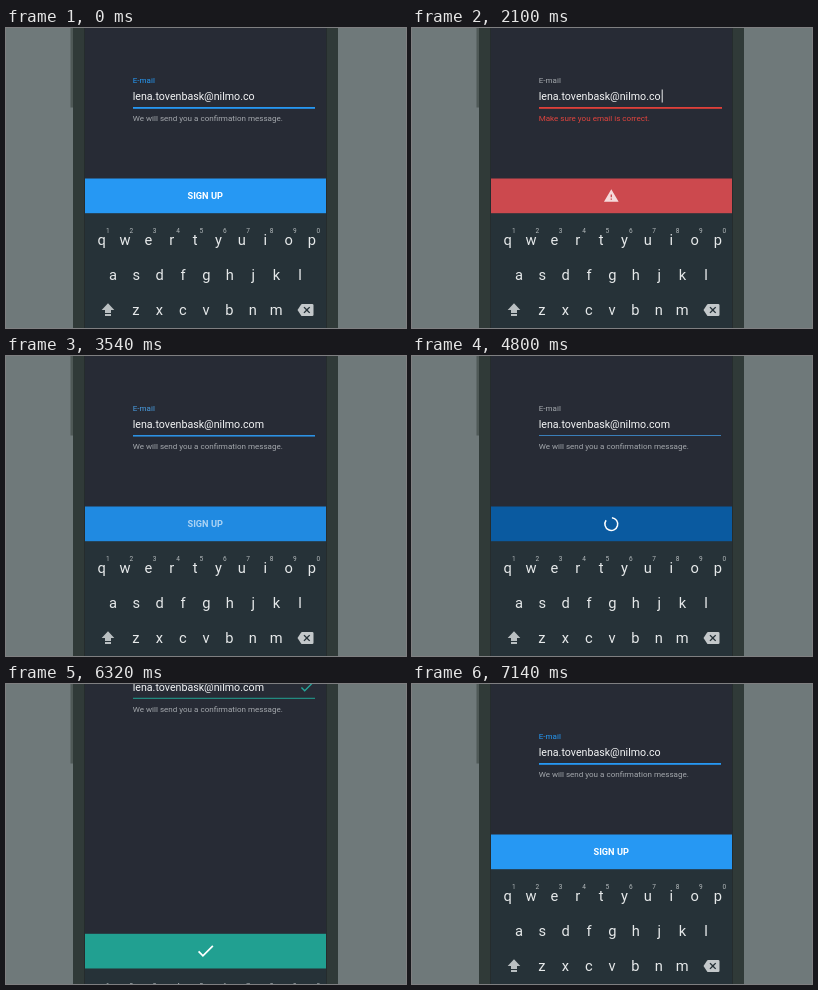
An HTML page that plays this animation: 400 by 300 pixels, repeating every 7160 ms.

```html
<!DOCTYPE html>
<html lang="en">
<head>
<meta charset="utf-8">
<title>E-mail sign up</title>
<style>
  html, body { margin: 0; width: 100%; height: 100%; overflow: hidden; background: #6f797a; }
  svg { display: block; width: 400px; height: 300px; font-family: Roboto, "Noto Sans", sans-serif; }
  .small { font-size: 8.05px; }
  .check { fill: none; stroke-width: 2; stroke-dasharray: 24; }
  #keys text { text-anchor: middle; fill: #e6e9ea; font-size: 14.67px; }
  #keys .digit { fill: #b4babc; font-size: 6.5px; }
</style>
</head>
<body>
<svg viewBox="0 0 400 300">
  <defs><clipPath id="screen"><rect x="79" y="0" width="241" height="300"/></clipPath></defs>
  <rect width="400" height="300" fill="#6f797a"/>
  <rect x="64.5" width="3" height="79.5" fill="#4f5957"/>
  <rect x="67" width="265" height="300" fill="#303a38"/>
  <rect x="78" width="243" height="300" fill="#252c2d"/>
  <g clip-path="url(#screen)">
    <rect x="79" width="241" height="300" fill="#272b35"/>

    <g id="form">
      <text id="label" class="small" x="126.7" y="55">E-mail</text>
      <text id="email" x="126.7" y="72" font-size="10.67" fill="#f4f5f6"></text>
      <rect id="cursor" y="61.5" width="1" height="13" fill="#e8eaec"/>
      <rect id="line" x="127" y="79"/>
      <text id="hint" class="small" x="126.7" y="93" fill="#a4a8ad">We will send you a confirmation message.</text>
      <text id="error" class="small" x="126.7" y="93" fill="#e0443e">Make sure you email is correct.</text>
      <path id="fieldCheck" class="check" stroke="#26a69a" transform="translate(292.7 60.2) scale(.667)" d="M4.1 12.7L9 17.6 20.3 6.3"/>
    </g>

    <g id="panel">
      <rect x="79" y="185" width="241" height="115" fill="#263238"/>
      <rect id="button" x="79" y="150.5" width="241" height="34.7"/>
      <text id="title" x="199.2" y="171.2" text-anchor="middle" font-size="9.2" font-weight="600" fill="#fff">SIGN UP</text>
      <path id="warn" fill="#fff" fill-rule="evenodd" transform="translate(191.3 159.8) scale(.667)"
        d="M1 21h22L12 2zM13 18h-2v-2h2zM13 14h-2v-4h2z"/>
      <path id="spinner" fill="none" stroke="#fff" stroke-width="1.5"/>
      <path id="buttonCheck" class="check" stroke="#fff" transform="translate(189 157) scale(.88)" d="M4.1 12.7L9 17.6 20.3 6.3"/>
      <circle id="touch" cx="270" cy="279" r="16" fill="#fff"/>
      <g id="keys"></g>
      <path fill="#b9bfc1" d="M102 275.3l6.3 6.7h-3.3v3h-6v-3h-3.300zM99 286h6v1.900h-6z"/>
      <path fill="#c3c8ca" fill-rule="evenodd" transform="translate(291.5 274) scale(.667)"
        d="M22 3H7q-1 0-1.600.9L0 12l5.400 8.100Q6 21 7 21h15q2 0 2-2V5q0-2-2-2zM19 15.600L17.600 17 14 13.400 10.400 17 9 15.600 12.600 12 9 8.400 10.400 7 14 10.600 17.600 7 19 8.400 15.400 12z"/>
    </g>
  </g>
</svg>
<script>
const LOOP = 7160;
const SHORT = 'lena.tovenbask@nilmo.co';
const el = {};
document.querySelectorAll('[id]').forEach(e => el[e.id] = e);

const BLUE = [38, 152, 243], RED = [224, 64, 58], NAVY = [10, 90, 160];
const TEAL = [33, 160, 145], GREY = [164, 168, 173], THIN = [58, 126, 184];

// Each track: time, value; straight between the steps.
const tracks = {
  button: [[1100, BLUE], [1260, RED], [2060, RED], [2440, BLUE], [3480, BLUE], [3760, NAVY],
    [5660, NAVY], [5880, TEAL], [6600, TEAL], [6601, BLUE]],
  label: [[1100, BLUE], [1260, GREY], [2580, GREY], [2680, BLUE], [3480, BLUE], [3700, GREY],
    [6600, GREY], [6601, BLUE]],
  line: [[1100, BLUE], [1260, RED], [2580, RED], [2680, BLUE], [3480, BLUE], [3700, THIN],
    [5660, THIN], [5880, TEAL], [6600, TEAL], [6601, BLUE]],
  lineHeight: [[3480, 1.8], [3700, 1], [6600, 1], [6601, 1.8]],
  error: [[1100, 0], [1260, 1], [2580, 1], [2680, 0]],
  title: [[1100, 1], [1190, 0], [2240, 0], [2440, 1], [3480, 1], [3640, 0], [6600, 0], [6601, 1]],
  warn: [[1160, 0], [1260, 1], [2060, 1], [2260, 0]],
  spinner: [[3600, 0], [3800, 1], [5640, 1], [5720, 0]],
  fieldCheck: [[5440, 0], [5640, 1], [6600, 1], [6601, 0]],
  buttonCheck: [[5680, 0], [5880, 1], [6600, 1], [6601, 0]],
  touch: [[2580, 0], [2640, .22], [2860, .22], [3080, 0]],
  away: [[6200, 0], [6400, 1], [6940, 1], [7140, 0]]
};
const cursorOn = [[460, 860], [1260, 1660], [2060, 3080]];

function at(name, t) {
  const steps = tracks[name];
  const i = steps.findIndex(s => s[0] > t);
  if (i === 0) return steps[0][1];
  if (i < 0) return steps[steps.length - 1][1];
  const [t0, a] = steps[i - 1], [t1, b] = steps[i];
  const k = (t - t0) / (t1 - t0);
  const mix = (x, y) => x + (y - x) * k;
  return Array.isArray(a) ? a.map((x, j) => mix(x, b[j])) : mix(a, b);
}

function addKeys(row, x, y, digits) {
  const put = (char, px, py, cls) => {
    const text = document.createElementNS('http://www.w3.org/2000/svg', 'text');
    text.setAttribute('x', px);
    text.setAttribute('y', py);
    if (cls) text.setAttribute('class', cls);
    text.textContent = char;
    el.keys.append(text);
  };
  [...row].forEach((char, i) => {
    const px = x + i * 23.37;
    put(char, px, y);
    if (digits) put((i + 1) % 10, px + 6.3, y - 12, 'digit');
  });
}
addKeys('qwertyuiop', 95.6, 217, true);
addKeys('asdfghjkl', 107, 251.8);
addKeys('zxcvbnm', 130, 286.8);

const set = (e, attrs) => { for (const k in attrs) e.setAttribute(k, attrs[k]); };
const rgb = c => `rgb(${c.map(Math.round)})`;

function arc(t) {
  const sweep = 270 + 30 * Math.cos((t - 4800) / 1333 * 2 * Math.PI);
  const gap = -115 + (t - 4800) * .36;
  const point = deg => {
    const a = deg * Math.PI / 180;
    return `${(199.3 + 6.4 * Math.cos(a)).toFixed(2)} ${(168 + 6.4 * Math.sin(a)).toFixed(2)}`;
  };
  const from = gap + (360 - sweep) / 2;
  return `M${point(from)}A6.4 6.4 0 1 1 ${point(from + sweep)}`;
}

function draw(t) {
  const away = (1 - Math.cos(Math.PI * at('away', t))) / 2;
  set(el.form, { transform: `translate(0 ${-98.5 * away})` });
  set(el.panel, { transform: `translate(0 ${150 * away})` });

  for (const name of ['button', 'label', 'line']) set(el[name], { fill: rgb(at(name, t)) });
  for (const name of ['error', 'title', 'warn', 'spinner', 'touch']) set(el[name], { opacity: at(name, t) });
  for (const name of ['fieldCheck', 'buttonCheck']) {
    const k = at(name, t);
    set(el[name], { 'stroke-dashoffset': 24 * (1 - k), opacity: k > 0 ? 1 : 0 });
  }

  const error = at('error', t);
  set(el.hint, { opacity: 1 - error });
  set(el.line, { width: 182 + error, height: at('lineHeight', t) });
  set(el.spinner, { d: arc(t) });

  const full = t >= 2620 && t < 6600;
  el.email.textContent = full ? SHORT + 'm' : SHORT;
  set(el.cursor, {
    x: full ? 259.5 : 249.7,
    opacity: cursorOn.some(([a, b]) => t >= a && t < b) ? 1 : 0
  });
}

const start = performance.now();
function tick() {
  draw((performance.now() - start) % LOOP);
  requestAnimationFrame(tick);
}
draw(0);
requestAnimationFrame(tick);
</script>
</body>
</html>
```
